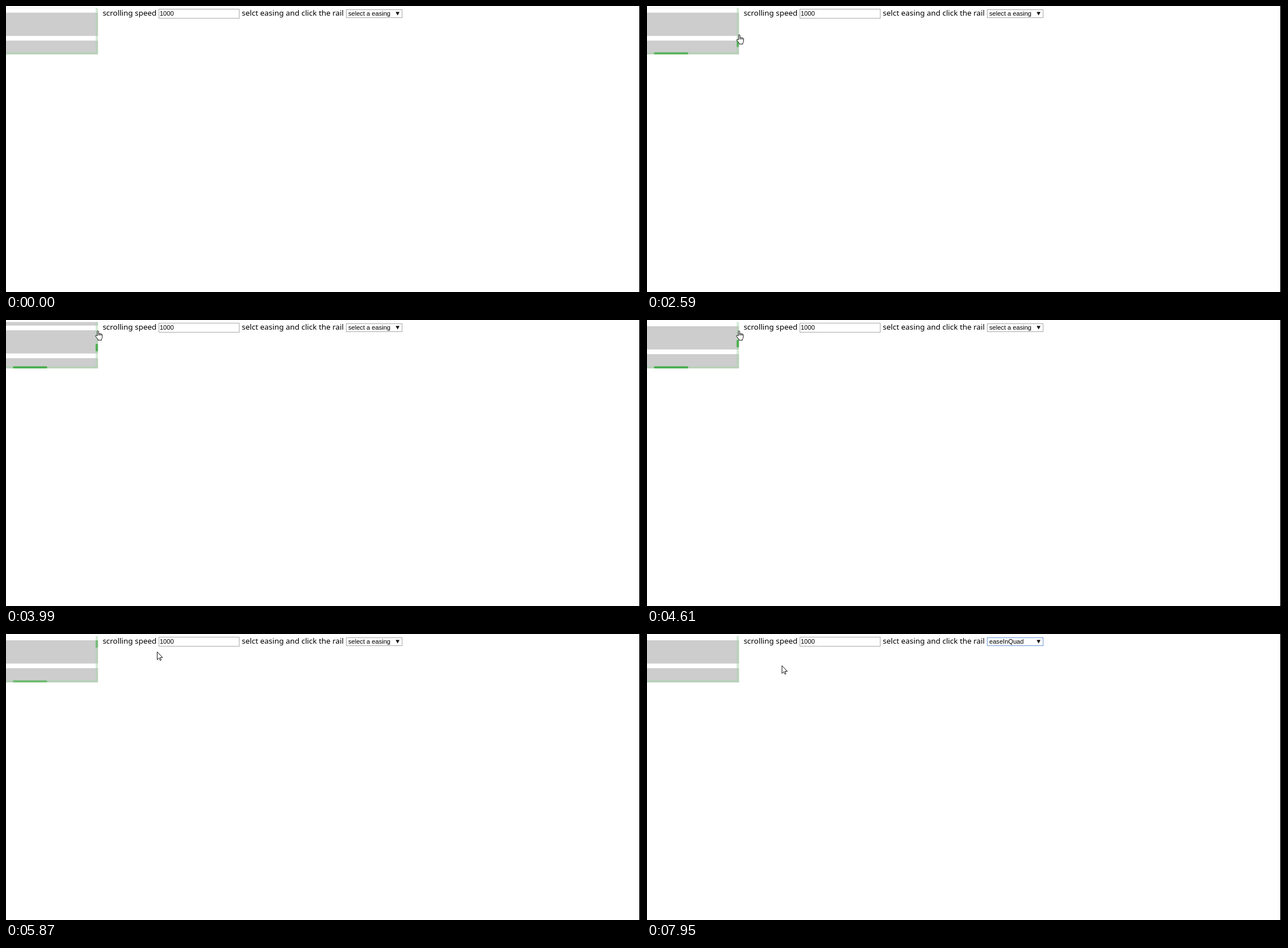
Animation, 1115 px wide and 502 px high, one loop 8000 ms. Source, as an HTML page:

```html
<!DOCTYPE html>
<html lang="en">
<head>
<meta charset="utf-8">
<title>Scrolling easing</title>
<style>
  html, body { margin: 0; width: 100%; height: 100%; overflow: hidden; background: #fff; }
  svg { display: block; width: 1115px; height: 502px; }
  .label { font: 13.42px "Noto Sans", sans-serif; }
  .field { font: 11.1px "Liberation Sans", Arial, sans-serif; }
  .option { font: 10.73px "Liberation Sans", Arial, sans-serif; }
  .crisp { shape-rendering: crispEdges; }
</style>
</head>
<body>
<svg viewBox="0 0 1115 502">
  <defs><clipPath id="view"><rect y="3.5" width="161.5" height="81.5"/></clipPath></defs>
  <rect class="crisp" x="1112" width="3" height="502"/>

  <g clip-path="url(#view)">
    <g id="stripes" fill="#cdcdcd"></g>
    <g fill="#a5d6a7" opacity=".5">
      <rect x="157.5" y="3" width="4.2" height="78.2"/>
      <rect y="81.2" width="162" height="4"/>
    </g>
    <g id="handles" fill="#4caf50">
      <rect id="bar" x="157.4" width="4.2" height="13" rx="1"/>
      <rect x="12.3" y="81.2" width="60" height="3.8" rx="1.5"/>
    </g>
  </g>

  <text class="label" x="169.7" y="17.4">scrolling speed</text>
  <rect class="crisp" x="268.5" y="5.5" width="141" height="16" fill="#fff" stroke="#a9a9a9"/>
  <text class="field" x="269.9" y="17.3">1000</text>
  <text class="label" x="414" y="17.4">selct easing and click the rail</text>

  <rect id="select" class="crisp" x="597.5" y="6.5" width="98" height="14" fill="#fff"/>
  <text id="value" class="field" x="601" y="17.3"></text>
  <path d="M684.3 10.6h6.6l-3.3 5.8z"/>

  <g id="list">
    <rect class="crisp" x="597.5" y="21.5" width="98" height="178" fill="#fff" stroke="#7aa0d4"/>
    <rect id="mark" x="598" width="97" height="13.63" fill="#1e90ff"/>
    <g id="options"></g>
  </g>

  <g fill="#fff" stroke="#111" stroke-linejoin="round">
    <path id="arrow" d="M.5.5V14.3L3.7 11.2 5.7 15.6 7.6 14.8 5.7 10.5H9.9Z"/>
    <path id="beam" fill="none" d="M-3-7.5H-1Q0-7.5 0-6.5Q0-7.5 1-7.5H3M0-6.5V6.5M-3 7.5H-1Q0 7.5 0 6.5Q0 7.5 1 7.5H3"/>
    <path id="hand" d="M-1.2 10V1.8Q0 .2 1.2 1.8V6.2Q2.5 5.3 3.4 6.5Q4.8 5.7 5.6 7Q7.2 6.5 7.6 8V12Q7.6 14 6.2 15.6V17.6H0V16.2L-4.2 10.9Q-4.8 9.2-3.2 9.2ZM1.2 6.2V9.4M3.4 6.5V9.4M5.6 7V9.6"/>
  </g>
</svg>
<script>
const $ = id => document.getElementById(id);
const NS = "http://www.w3.org/2000/svg";
const LOOP = 8000, PITCH = 49, ROW = 13.63, LIST_TOP = 21.7;

function add(parent, tag, attrs) {
  const el = document.createElementNS(NS, tag);
  for (const k in attrs) el.setAttribute(k, attrs[k]);
  return parent.appendChild(el);
}

for (let i = -1; i < 2; i++)
  add($("stripes"), "rect", { y: i * PITCH, width: 162, height: 40.8 });

const names = ["select a easing"];
for (const curve of ["Quad", "Cubic", "Quart", "Quint"])
  for (const kind of ["In", "Out", "InOut"]) names.push("ease" + kind + curve);

const options = names.map((name, i) => {
  const el = add($("options"), "text", { class: "option", x: 601.2, y: LIST_TOP + ROW * i + 10.6 });
  el.textContent = name;
  return el;
});

// Bursts of screen updates: first, last, count
const bursts = [
  [470, 840, 6], [1000, 1640, 9], [1800, 2170, 6], [2330, 2590, 4],
  [2810, 3590, 11], [3700, 3990, 5], [4280, 5070, 11], [5150, 5380, 4],
  [5760, 6490, 10], [6640, 7010, 6], [7260, 7390, 3], [7630, 7630, 1], [7880, 7950, 2]
];

// Pointer path: time, shape, x, y
const path = [
  [470, "arrow", 867, 434], [840, "beam", 314, 12], [1000, "beam", 350, 12],
  [1160, "beam", 401, 13], [1320, "beam", 290, 13], [1480, "arrow", 215, 28],
  [1640, "arrow", 175, 39], [2170, "arrow", 162, 48], [2330, "hand", 162, 48.5],
  [2590, "hand", 162, 49.3], [2810, "hand", 159.5, 47.5], [3590, "hand", 159.5, 47.5],
  [3990, "hand", 161.5, 17.8], [5700, "hand", 161.5, 17.8], [5760, "arrow", 190, 30],
  [6160, "arrow", 560, 34], [6400, "arrow", 641, 14], [6490, "arrow", 641, 13],
  [6640, "arrow", 638.5, 11], [7010, "arrow", 641, 50], [7390, "arrow", 641, 45],
  [7800, "arrow", 641, 45], [7880, "arrow", 430, 50], [7950, "arrow", 236.5, 55]
];

const clamp = v => Math.max(0, Math.min(1, v));
const ramp = (t, start, span) => clamp((t - start) / span);
const swing = p => (1 - Math.cos(Math.PI * p)) / 2;

function snap(t) {
  let last = 0;
  for (const [from, to, count] of bursts) {
    if (t < from) break;
    const step = count > 1 ? (to - from) / (count - 1) : 1;
    last = from + step * Math.min(count - 1, Math.floor((t - from + 0.5) / step));
  }
  return last;
}

function pointer(t) {
  let i = path.length - 1;
  while (i >= 0 && path[i][0] > t + 0.5) i--;
  if (i < 0) return null;
  const a = path[i], b = path[i + 1] || a;
  const p = b === a ? 0 : ramp(t, a[0], b[0] - a[0]);
  return { shape: a[1], x: a[2] + (b[2] - a[2]) * p, y: a[3] + (b[3] - a[3]) * p };
}

function draw(time) {
  const t = snap(time);

  const shift = 104.3 * swing(ramp(t, 2790, 1140)) + 189 * swing(ramp(t, 4240, 1140));
  $("stripes").setAttribute("transform", `translate(0 ${(11.7 + shift) % PITCH})`);
  $("bar").setAttribute("y", 59 - shift / 6.1);
  $("handles").setAttribute("opacity", ramp(t, 2250, 400) - ramp(t, 5700, 400));

  const cur = pointer(t);
  for (const shape of ["arrow", "beam", "hand"]) {
    const on = cur && cur.shape === shape;
    $(shape).setAttribute("display", on ? "inline" : "none");
    if (on) $(shape).setAttribute("transform", `translate(${cur.x} ${cur.y})`);
  }

  const open = t > 6489 && t < 7629;
  $("list").setAttribute("display", open ? "inline" : "none");
  $("select").setAttribute("stroke", t > 6489 ? "#6a97d8" : "#a9a9a9");
  $("value").textContent = names[t > 7629 ? 1 : 0];
  if (open) {
    const row = Math.max(0, Math.floor((cur.y - LIST_TOP) / ROW));
    $("mark").setAttribute("y", LIST_TOP + row * ROW);
    options.forEach((el, i) => el.setAttribute("fill", i === row ? "#fff" : "#000"));
  }
}

const start = performance.now();
function tick() {
  draw((performance.now() - start) % LOOP);
  requestAnimationFrame(tick);
}
tick();
</script>
</body>
</html>
```
